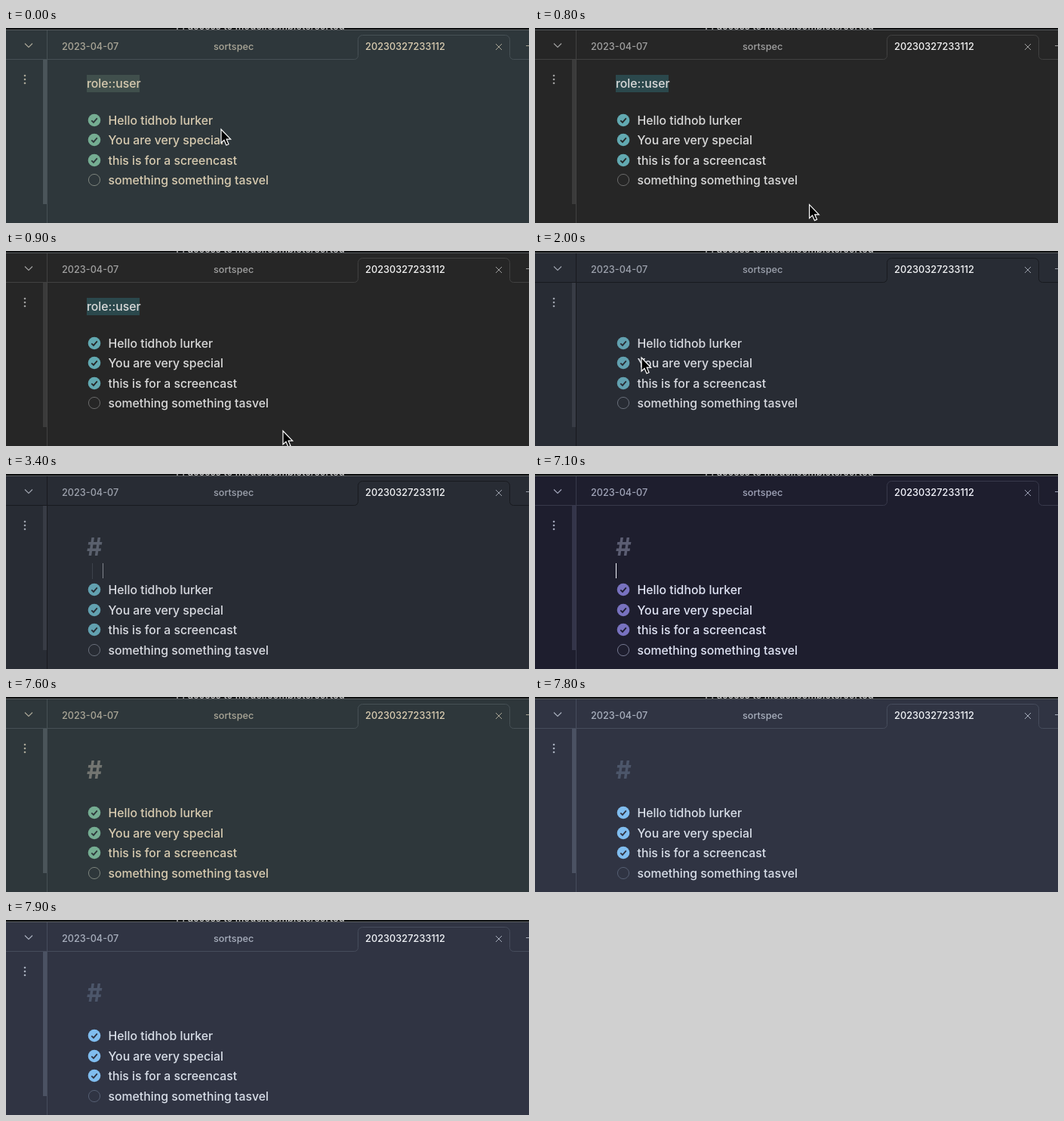
An HTML page with a canvas that plays this animation: 693x258 px, repeating every 8 s.

```html
<!DOCTYPE html>
<html lang="en">
<head>
<meta charset="utf-8">
<title>Theme switching</title>
<style>
html, body { margin: 0; width: 100%; height: 100%; overflow: hidden; background: #262626; }
canvas { display: block; }
</style>
</head>
<body>
<canvas id="stage"></canvas>
<script>
const W = 693, H = 258, LOOP = 8000;
const FONT = 'Inter, "Liberation Sans", sans-serif';
const canvas = document.getElementById('stage');
const ctx = canvas.getContext('2d');
const dpr = window.devicePixelRatio || 1;
canvas.width = W * dpr;
canvas.height = H * dpr;
canvas.style.width = W + 'px';
canvas.style.height = H + 'px';

const theme = (bg, line, bar, text, title, muted, check, ring, mark, select) =>
  ({ bg, line, bar, text, title, muted, check, ring, mark, select });

const forest = theme('#2e373b', '#465055', '#4b555a', '#d8cbb0', '#d8cbb0', '#aaa697', '#75ad92', '#7c837c', '#737571', '#404f4c');
const plain = theme('#262626', '#414141', '#3b3b3b', '#dadada', '#f2f2f2', '#a0a0a0', '#62a9b1', '#6a6a6a', '#666666', '#2b484c');
const atom = theme('#282c34', '#181a1f', '#383c45', '#d9dbe1', '#f2f3f5', '#9da2ad', '#62a1b0', '#686e79', '#5a606d', '#2e4650');
const vampire = theme('#292a37', '#404253', '#393b4c', '#f7f7f4', '#ffffff', '#a2a6bd', '#447bd0', '#6272a4', '#6272a4', '#34466a');
const mocha = theme('#1e1e2e', '#38394b', '#34354a', '#e0e4f4', '#f3f4fc', '#a0a4b8', '#7872bf', '#74778f', '#5b5d72', '#34345a');
const north = theme('#303443', '#464c5c', '#4b5263', '#d9dfe9', '#f0f3f7', '#a8afbd', '#80bdef', '#555e72', '#4c566a', '#3c4a60');

const themes = [[0, forest], [400, plain], [1300, atom], [3800, vampire], [7100, mocha], [7500, forest], [7800, north]];
const pointer = [[0, 285, 134], [100, 285, 134], [900, 367, 238], [1200, 367, 238], [1600, 141, 76],
  [1800, 141, 76], [2000, 141, 141], [2100, 326, 204], [2600, 326, 204], [2900, 459, 236]];
const ROLE_END = 1800, HEADING = 2900, INDENT = 3200, OUTDENT = 3800;
const tasks = ['Hello tidhob lurker', 'You are very special', 'this is for a screencast', 'something something tasvel'];

const themeAt = t => themes.filter(k => k[0] <= t).pop()[1];

function pointerAt(t) {
  const i = pointer.findIndex(k => k[0] > t);
  if (i < 0) return null;
  const [t0, x0, y0] = pointer[i - 1], [t1, x1, y1] = pointer[i];
  const p = (t - t0) / (t1 - t0);
  const e = p * p * (3 - 2 * p);
  return [x0 + (x1 - x0) * e, y0 + (y1 - y0) * e];
}

function box(x, y, w, h, color) {
  ctx.fillStyle = color;
  ctx.fillRect(x, y, w, h);
}

function label(str, x, y, size, color, weight = 500) {
  ctx.font = `${weight} ${size}px ${FONT}`;
  ctx.fillStyle = color;
  ctx.fillText(str, x, y);
}

function stroke(points, color, width = 1) {
  ctx.beginPath();
  points.forEach(([x, y]) => ctx.lineTo(x, y));
  ctx.strokeStyle = color;
  ctx.lineWidth = width;
  ctx.stroke();
}

function disc(x, y, r, color) {
  ctx.beginPath();
  ctx.arc(x, y, r, 0, Math.PI * 2);
  ctx.fillStyle = color;
  ctx.fill();
}

function topEdge() {
  ctx.save();
  ctx.beginPath();
  ctx.rect(0, 0, W, 2);
  ctx.clip();
  box(0, 0, W, 2, '#0d0f10');
  label('[ : access to model.complete/sorted', 225, 1.5, 13, '#c8c8c8');
  ctx.restore();
  box(0, 2, W, 1, '#5a5d60');
}

function tabs(c) {
  ctx.beginPath();
  ctx.moveTo(0, 41.5);
  ctx.lineTo(461, 41.5);
  ctx.arcTo(466.5, 41.5, 466.5, 36, 5);
  ctx.arcTo(466.5, 9.5, 473, 9.5, 6);
  ctx.arcTo(667.5, 9.5, 667.5, 16, 6);
  ctx.arcTo(667.5, 41.5, 673, 41.5, 5);
  ctx.lineTo(W, 41.5);
  ctx.strokeStyle = c.line;
  ctx.lineWidth = 1;
  ctx.stroke();
  box(54, 3, 1, H, c.line);
  box(49, 42, 5, 191, c.bar);

  label('2023-04-07', 74, 29, 12.7, c.muted);
  label('sortspec', 275, 29, 12.7, c.muted);
  label('20230327233112', 476, 29, 12.8, c.title);
  stroke([[25, 20.5], [30, 25.5], [35, 20.5]], c.muted, 1.2);
  stroke([[649, 21], [657, 29]], c.muted);
  stroke([[657, 21], [649, 29]], c.muted);
  stroke([[689, 23.5], [W, 23.5]], c.muted);
  [63, 68, 73].forEach(y => disc(25, y, 1.3, c.muted));
}

function task(str, y, done, c) {
  if (done) {
    disc(117, y, 8.3, c.check);
    stroke([[113.3, y + 0.3], [116, y + 2.9], [120.8, y - 2.6]], c.bg, 1.8);
  } else {
    ctx.beginPath();
    ctx.arc(117, y, 7.6, 0, Math.PI * 2);
    ctx.strokeStyle = c.ring;
    ctx.lineWidth = 1;
    ctx.stroke();
  }
  label(str, 135.5, y + 6, 15.8, c.text);
}

function caret(t, c) {
  if (t < HEADING || t >= 7500) return;
  if (t < OUTDENT) {
    const indented = t >= INDENT;
    if (indented) box(114, 118, 1, 21, '#3e434c');
    box(indented ? 128 : 107, 118, 1, 20, '#80848c');
  } else if ((t - 4650 + 1200) % 1200 < 600) {
    box(107, 118, 1, 20, c.title);
  }
}

function arrow(x, y) {
  ctx.save();
  ctx.translate(x, y);
  ctx.beginPath();
  [[0, 0], [0, 18], [4, 14.3], [6.9, 21], [10, 19.7], [7.2, 13.2], [12.7, 13.2]]
    .forEach(([px, py]) => ctx.lineTo(px, py));
  ctx.closePath();
  ctx.fillStyle = '#000';
  ctx.fill();
  ctx.strokeStyle = '#fff';
  ctx.lineWidth = 1.2;
  ctx.stroke();
  ctx.restore();
}

function draw(t) {
  const c = themeAt(t);
  const heading = t >= HEADING;
  ctx.setTransform(dpr, 0, 0, dpr, 0, 0);
  box(0, 0, W, H, c.bg);
  topEdge();
  tabs(c);
  if (t < ROLE_END) {
    box(107, 62, 70, 23, c.select);
    label('role::user', 107, 79, 15.8, c.text);
  }
  if (heading) label('#', 107, 108, 32, c.mark, 700);
  const top = heading ? 153.4 : 122;
  tasks.forEach((str, i) => task(str, Math.round(top + i * 26.4), i < 3, c));
  caret(t, c);
  const p = pointerAt(t);
  if (p) arrow(...p);
}

const start = performance.now();
function tick() {
  draw((performance.now() - start) % LOOP);
  requestAnimationFrame(tick);
}
tick();
</script>
</body>
</html>
```
